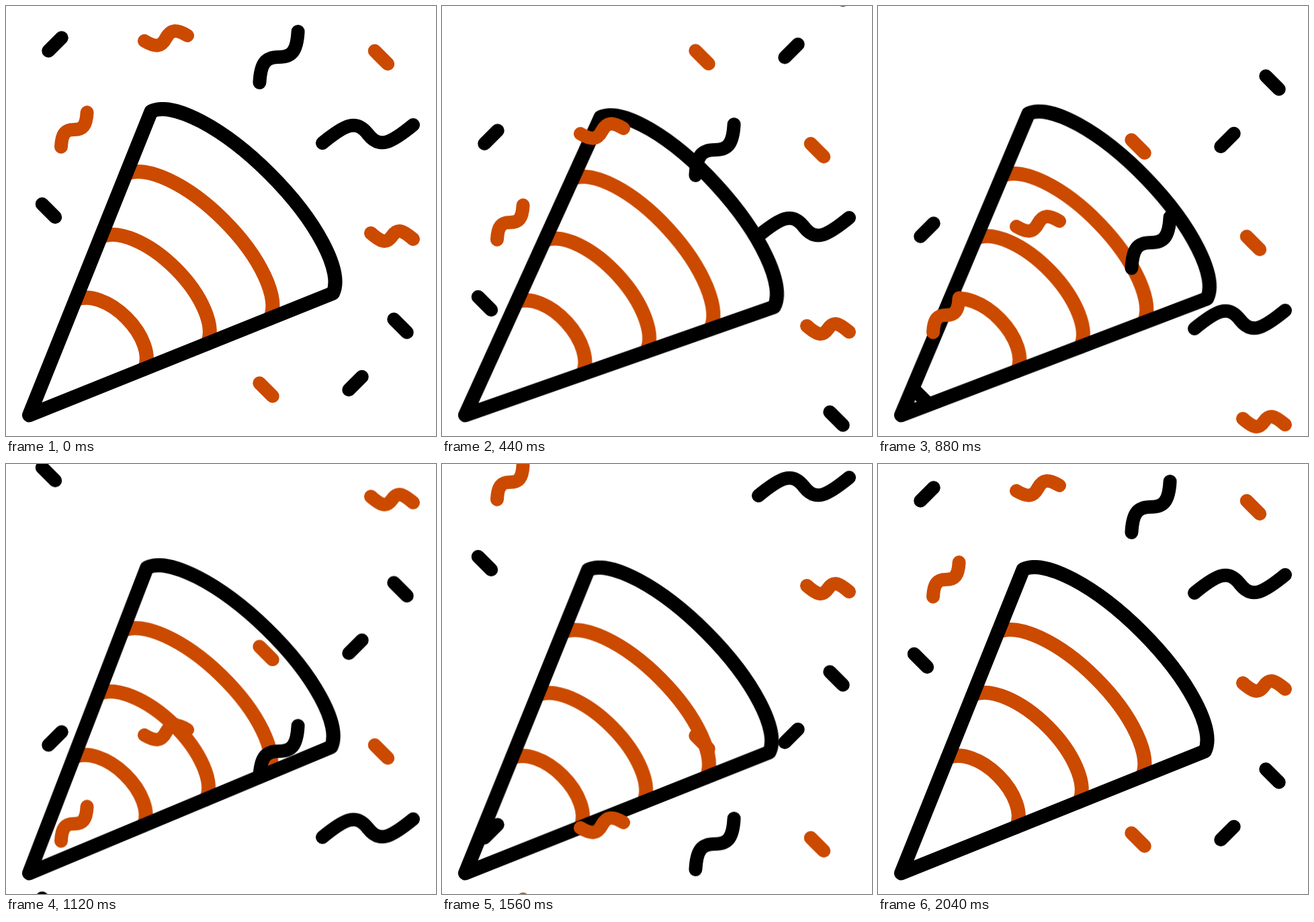
These frames come from a looping animation (640x640 px, 2.08 s). An HTML page:

```html
<!DOCTYPE html>
<html lang="en">
<head>
<meta charset="utf-8">
<title>Party popper</title>
<style>
  html, body {
    margin: 0;
    width: 100%;
    height: 100%;
    overflow: hidden;
    background: #fff;
  }

  svg {
    display: block;
    width: 100%;
    height: 100%;
    fill: none;
    stroke-width: 21;
    stroke-linecap: round;
    stroke-linejoin: round;
  }

  .ink { stroke: #000; }
  .accent { stroke: #cb4a00; }

  #cone { transform-origin: 34.5px 609px; }
  #confetti { stroke-width: 20; }

  .fall { animation: 2080ms steps(52) infinite; }
  .leave { animation-name: leave; }
  .enter { animation-name: enter; }

  @keyframes leave {
    to { transform: translateY(652.7px); }
  }

  @keyframes enter {
    from { transform: translateY(-627.5px); }
  }
</style>
</head>
<body>
<svg viewBox="0 0 640 640">
  <defs><g id="confetti"></g></defs>
  <g id="cone"></g>
  <g class="fall leave"><use href="#confetti"/></g>
  <g class="fall enter"><use href="#confetti"/></g>
</svg>

<script>
  const cone = document.getElementById('cone');
  const confetti = document.getElementById('confetti');

  function stroke(parent, kind, d) {
    const path = document.createElementNS('http://www.w3.org/2000/svg', 'path');
    path.setAttribute('class', kind);
    path.setAttribute('d', d);
    parent.append(path);
  }

  // The cone mirrors across the diagonal x + y = axis.
  const tip = { x: 34.5, y: 609 };
  const axis = tip.x + tip.y;

  // Flattened arc from a point on the left edge to its mirror image;
  // reach is the share of the edge length, depth the short radius.
  function arc(reach, depth) {
    const x = tip.x + 181.5 * reach;
    const y = tip.y - 452 * reach;
    const long = (axis - x - y) / Math.SQRT2 + 1.3;
    return `${x} ${y} A${long} ${depth} 45 0 1 ${axis - y} ${axis - x}`;
  }

  stroke(cone, 'accent', 'M' + arc(.379, 43));
  stroke(cone, 'accent', 'M' + arc(.586, 54));
  stroke(cone, 'accent', 'M' + arc(.793, 63));
  stroke(cone, 'ink', `M${tip.x} ${tip.y} L${arc(1, 67)} Z`);

  // Diagonal dash around a centre; slope 1 falls, -1 rises.
  function dash(kind, x, y, slope) {
    const half = 9.75;
    stroke(confetti, kind,
      `M${x - half} ${y - half * slope} L${x + half} ${y + half * slope}`);
  }

  // S-curve around a centre: one half is given by its end and two handles,
  // the other half is the same turned by 180 degrees.
  function squiggle(kind, x, y, half, scale = 1) {
    const at = sign => half.map(([dx, dy]) =>
      `${x + sign * scale * dx} ${y + sign * scale * dy}`);
    const [end, h1, h2] = at(1);
    const [far, g1, g2] = at(-1);
    stroke(confetti, kind, `M${end} C${h1} ${h2} ${x} ${y} C${g2} ${g1} ${far}`);
  }

  dash('ink', 73, 57, -1);
  dash('ink', 63.5, 304.5, 1);
  dash('ink', 587, 476, 1);
  dash('ink', 520, 561.5, -1);
  dash('accent', 558.5, 76.5, 1);
  dash('accent', 387, 571, 1);

  const upright = [[28.6, -38], [27, -8], [19, 0]];
  squiggle('ink', 406, 76, upright);
  squiggle('accent', 101.3, 184, upright, .675);
  squiggle('ink', 538.5, 190.5, [[-67.5, 13.5], [-34.5, -13.5], [-17.5, -22.5]]);
  squiggle('accent', 238, 48, [[-32, 4], [-15, 14], [-7, 13]]);
  squiggle('accent', 574.5, 342.5, [[-31.5, -4.5], [-18.5, 6.5], [-9.5, 13.5]]);

  // The cone swings from pose to pose, seven 40 ms steps each, then rests.
  const steps = 52;
  const poses = [0, 11, -2.8, 1.1, -.8, .5, 0];

  function angle(step) {
    const i = Math.floor(step / 7);
    if (i >= poses.length - 1) return 0;
    const eased = (1 - Math.cos(Math.PI * (step % 7) / 7)) / 2;
    return poses[i] + (poses[i + 1] - poses[i]) * eased;
  }

  const swing = Array.from({ length: steps + 1 }, (_, step) => ({
    transform: `rotate(${angle(step)}deg)`,
    easing: 'step-end'
  }));
  cone.animate(swing, { duration: 2080, iterations: Infinity });
</script>
</body>
</html>
```
